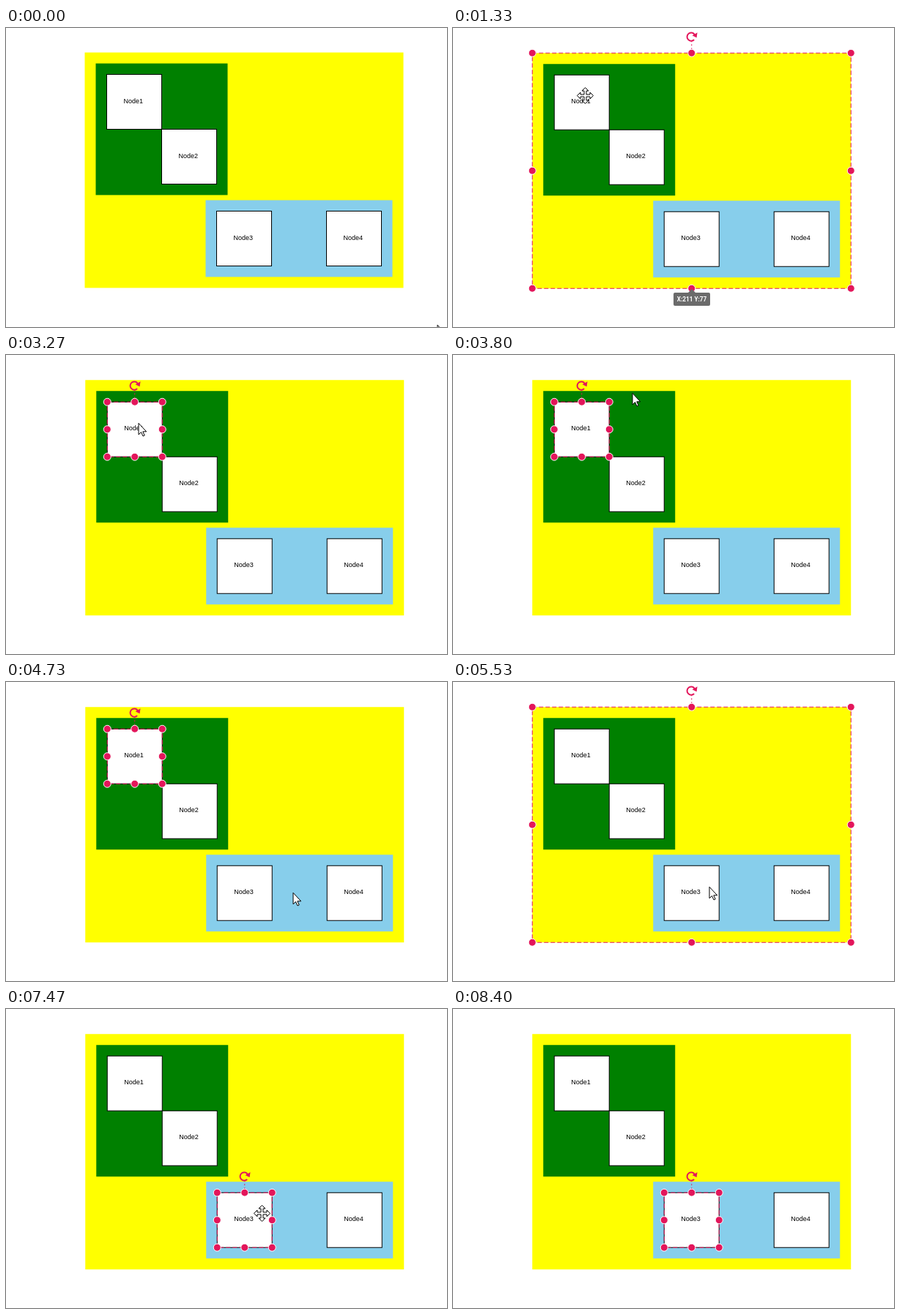
Animation, 602 px wide and 409 px high, one loop 9070 ms. Source, as an HTML page:

```html
<!DOCTYPE html>
<html lang="en">
<head>
<meta charset="utf-8">
<title>Nested group selection</title>
<style>
  html, body { margin: 0; width: 100%; height: 100%; overflow: hidden; background: #fff; }
  svg { display: block; width: 602px; height: 409px; }
  .node rect { fill: #fff; stroke: #000; }
  .node text { font: 9px "Liberation Sans", Arial, sans-serif; fill: #000; }
  .frame { fill: none; stroke: #e3165b; stroke-dasharray: 6 3; }
  .stem { stroke: #e3165b; stroke-dasharray: 2 3; }
  .handle { fill: #e3165b; stroke: #fff; }
  .ring { fill: none; stroke: #e3165b; stroke-width: 2; }
  .head { fill: #e3165b; }
  #tip { fill: #6b6b6b; }
  #tip text { font: 700 8.2px Roboto, sans-serif; fill: #fff; text-anchor: middle; }
  .cursor { fill: #fff; stroke: #000; }
</style>
</head>
<body>
<svg viewBox="0 0 602 409">
  <g id="diagram">
    <g id="shapes"></g>
    <g id="selector"></g>
  </g>
  <g id="tip">
    <path d="M326 357l5 5h-10z"/>
    <rect x="301" y="362" width="50" height="18" rx="2"/>
    <text x="326" y="374">X:211 Y:77</text>
  </g>
  <path id="arrow" class="cursor" d="M.5 .8V16.4L4 13L6.5 18.5L8.7 17.5L6.3 12.3H11.2Z"/>
  <path id="move" class="cursor"/>
</svg>
<script>
const LOOP = 9070, TICK = 1000 / 15, LAST = 135;
const SIDE = 75, PAD = 15;
const $ = id => document.getElementById(id);
const clamp = v => Math.max(0, Math.min(1, v));

// Nodes are squares; every group is the padded bounds of its children.
const node = (x, y) => ({ x, y, w: SIDE, h: SIDE });
function group(fill, ...kids) {
  const x = Math.min(...kids.map(k => k.x)) - PAD;
  const y = Math.min(...kids.map(k => k.y)) - PAD;
  const right = Math.max(...kids.map(k => k.x + k.w)) + PAD;
  const bottom = Math.max(...kids.map(k => k.y + k.h)) + PAD;
  return { fill, x, y, w: right - x, h: bottom - y };
}
const X = 137.5, Y = 63.5, LOW = Y + 187;
const nodes = [node(X, Y), node(X + SIDE, Y + SIDE), node(X + 2 * SIDE, LOW), node(X + 4 * SIDE, LOW)];
const green = group('#008000', nodes[0], nodes[1]);
const blue = group('#87ceeb', nodes[2], nodes[3]);
const outer = group('#ff0', green, blue);

// Each click selects one level deeper; times are in ticks.
const clicks = [
  { at: 10, box: outer, grab: 21 },
  { at: 32, box: green, grab: 0 },
  { at: 49, box: nodes[0], grab: 6 },
  { at: 83, box: outer, grab: 11 },
  { at: 97, box: blue, grab: 0 },
  { at: 111, box: nodes[2], grab: 5 }
];

// Pointer sweeps: progress along the path is p ** ease.
const sweeps = [
  { from: 0, to: 6, ease: .8, d: 'M588 405Q330 200 179 89' },
  { from: 19, to: 20, ease: 1, d: 'M179 89L180 92' },
  { from: 54, to: 68, ease: .73, d: 'M180 92C130 60 190 32 245 52S340 200 345 279' },
  { from: 68, to: 79, ease: .5, d: 'M345 279L391 287L349 279' },
  { from: 116, to: 126, ease: 1, d: 'M349 279C450 230 380 139 280 139S99 200 99 290V420' }
];
for (const s of sweeps) {
  s.path = document.createElementNS('http://www.w3.org/2000/svg', 'path');
  s.path.setAttribute('d', s.d);
  s.length = s.path.getTotalLength();
}

function pointerAt(tick) {
  const s = sweeps.findLast(s => s.from < tick) || sweeps[0];
  const p = clamp((tick - s.from) / (s.to - s.from));
  return s.path.getPointAtLength(s.length * p ** s.ease);
}

const rect = ({ x, y, w, h }, attrs) =>
  `<rect x="${x}" y="${y}" width="${w}" height="${h}" ${attrs}/>`;

function selectorMarkup(box) {
  const { x, y, w, h } = box, cx = x + w / 2;
  let out = rect(box, 'class="frame"') +
    `<path class="stem" d="M${cx} ${y}v-16"/>
    <g transform="translate(${cx} ${y - 22.5})">
      <path class="ring" d="M4.2-2.6A5.6 5.6 0 1 0 3.4 4.2"/>
      <path class="head" d="M7.8-5.6L6.8 1.4L.8-1.6Z"/>
    </g>`;
  for (let i = 0; i < 9; i++)
    if (i !== 4)
      out += `<circle class="handle" cx="${x + w * (i % 3) / 2}" cy="${y + h * Math.floor(i / 3) / 2}" r="5"/>`;
  return out;
}

$('shapes').innerHTML =
  [outer, green, blue].map(g => rect(g, `fill="${g.fill}"`)).join('') +
  nodes.map((n, i) => `<g class="node">${rect(n, '')}
    <text x="${n.x + 23}" y="${n.y + 39}">Node${i + 1}</text></g>`).join('');

// One arm of the four-way cursor, turned in quarter steps.
const arm = [[-1.5, -1.5], [-1.5, -6.5], [-4.5, -6.5], [0, -11], [4.5, -6.5], [1.5, -6.5]];
const turn = ([x, y], n) => n ? turn([-y, x], n - 1) : [x, y];
$('move').setAttribute('d', 'M' + [0, 1, 2, 3].flatMap(n => arm.map(p => turn(p, n))).join('L') + 'Z');

let shown;
function draw(time) {
  const tick = Math.min(LAST, Math.floor((time % LOOP + 4) / TICK));
  const click = clicks.findLast(c => c.at <= tick);
  if (click !== shown) {
    $('selector').innerHTML = click ? selectorMarkup(click.box) : '';
    shown = click;
  }
  // the first grab nudges the whole diagram
  const nudge = tick > clicks[0].at ? .75 : 0;
  $('diagram').setAttribute('transform', `translate(${nudge} ${nudge})`);
  $('tip').setAttribute('opacity', clamp(Math.min(tick - 10, 34 - tick) / 2));

  const { x, y } = pointerAt(tick);
  const held = click ? tick - click.at : 0;
  const kind = held > 0 && held <= click.grab ? 'move' : 'arrow';
  for (const id of ['arrow', 'move']) {
    $(id).setAttribute('transform', `translate(${Math.round(x) + .5} ${Math.round(y) + .5})`);
    $(id).style.display = id === kind ? '' : 'none';
  }
}

const start = performance.now();
function loop() {
  draw(performance.now() - start);
  requestAnimationFrame(loop);
}
loop();
</script>
</body>
</html>
```
